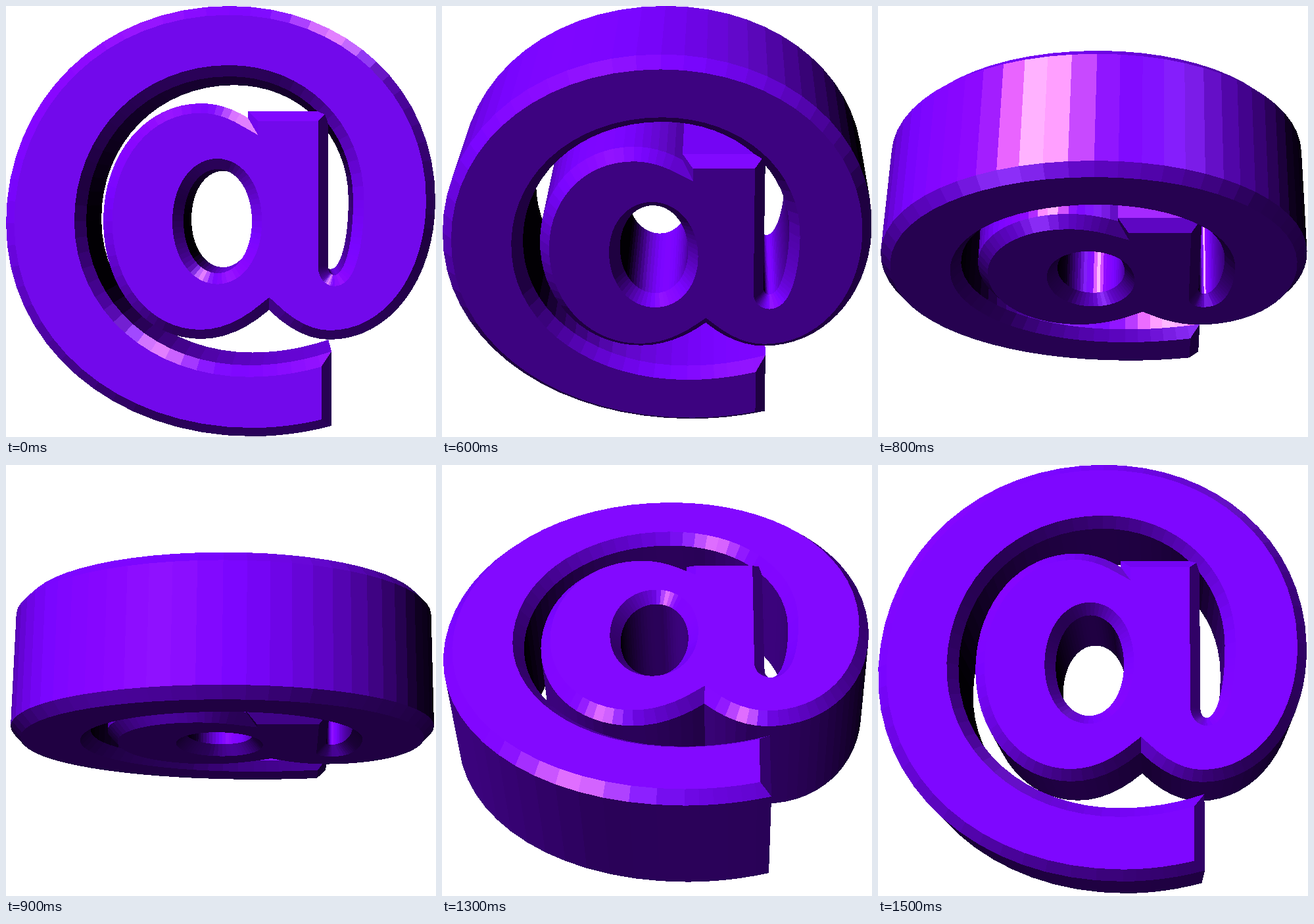
An HTML page with a canvas for the animation above (1600 ms loop, 654 by 655 pixels).

```html
<!DOCTYPE html>
<html lang="en">
<head>
<meta charset="utf-8">
<title>Turning at sign</title>
<style>
html, body { margin: 0; height: 100%; overflow: hidden; background: #fff; }
canvas { display: block; }
</style>
</head>
<body>
<canvas id="stage" width="654" height="655"></canvas>
<script>
const W = 654, H = 655;
const ctx = document.getElementById('stage').getContext('2d');

// Camera distance, vanishing point, height of the axis below it,
// half wall depth, bevel inset and bevel height
const FOCAL = 2200, VX = 432, VY = 284.5, AXIS = 41.5, WALL = 85, INSET = 15, RISE = 16;
const FRONT_SCALE = FOCAL / (FOCAL - WALL);

// Draws an outline through key points, given as seen from the front
class Outline {
  constructor(x, y) { this.points = [[x, y]]; }
  get last() { return this.points[this.points.length - 1]; }
  line(x, y) { this.points.push([x, y]); return this; }
  curve(x, y, cornerX, cornerY, pull, steps) {
    const [x0, y0] = this.last;
    const mix = (t, a, corner, b) => {
      const u = 1 - t, c = a + (corner - a) * pull, d = b + (corner - b) * pull;
      return u * u * u * a + 3 * u * u * t * c + 3 * u * t * t * d + t * t * t * b;
    };
    for (let k = 1; k <= steps; k++) this.line(mix(k / steps, x0, cornerX, x), mix(k / steps, y0, cornerY, y));
    return this;
  }
  // Quarter ovals that leave sideways or upright
  sideways(x, y) { return this.curve(x, y, x, this.last[1], 0.57, 16); }
  upright(x, y) { return this.curve(x, y, this.last[0], y, 0.57, 16); }
  // Shallow parabolas that start or end level
  fromLevel(x, y) { return this.curve(x, y, (this.last[0] + x) / 2, this.last[1], 2 / 3, 6); }
  toLevel(x, y) { return this.curve(x, y, (this.last[0] + x) / 2, y, 2 / 3, 6); }
  // Closes on the first point and converts to model units
  close() {
    this.points.pop();
    return this.points.map(([x, y]) => [(x - VX) / FRONT_SCALE, (y - VY) / FRONT_SCALE - AXIS]);
  }
}

const letter = new Outline(495, 525)
  .line(495, 638).toLevel(375, 654)                                     // tail
  .sideways(0, 330).upright(340, 0).sideways(653, 295).upright(492, 507) // outer ring
  .fromLevel(400, 462).toLevel(297, 506)                                // cusp
  .sideways(148, 327).upright(297, 148).fromLevel(368, 170)             // bowl
  .line(368, 160).line(490, 160).line(490, 395)                         // stem
  .upright(499, 409).sideways(528, 295)                                 // hook
  .upright(340, 107).sideways(122, 327).upright(370, 546)               // inner ring
  .fromLevel(495, 525).close();

const counter = new Outline(322, 248)
  .sideways(270, 327).upright(322, 406).sideways(374, 327).upright(322, 248).close();

// Each contour becomes four rings: front edge, two wall edges, back edge
function buildFaces() {
  const faces = [], front = [], back = [];
  for (const points of [letter, counter]) {
    const count = points.length;
    const normals = points.map(([x, y], i) => {
      const [x2, y2] = points[(i + 1) % count], len = Math.hypot(x2 - x, y2 - y);
      return [(y2 - y) / len, (x - x2) / len];
    });
    const inner = points.map(([x, y], i) => {
      const a = normals[(i + count - 1) % count], b = normals[i];
      const k = INSET / (1 + a[0] * b[0] + a[1] * b[1]);
      return [x - k * (a[0] + b[0]), y - k * (a[1] + b[1])];
    });
    const lift = (ring, z) => ring.map(([x, y]) => [x, y, z]);
    const rings = [lift(inner, WALL + RISE), lift(points, WALL), lift(points, -WALL), lift(inner, -WALL - RISE)];
    front.push(rings[0]);
    back.push(rings[3]);
    const slant = INSET / Math.hypot(INSET, RISE);
    normals.forEach(([nx, ny], i) => {
      const j = (i + 1) % count;
      [slant, 0, -slant].forEach((nz, k) => {
        const flat = Math.sqrt(1 - nz * nz);
        const quad = [rings[k][i], rings[k][j], rings[k + 1][j], rings[k + 1][i]];
        faces.push({ rings: [quad], normal: [nx * flat, ny * flat, nz] });
      });
    });
  }
  faces.push({ rings: front, normal: [0, 0, 1] }, { rings: back, normal: [0, 0, -1] });
  return faces;
}

const dot = (a, b) => a[0] * b[0] + a[1] * b[1] + a[2] * b[2];
const unit = v => v.map(c => c / Math.hypot(...v));
const KEY = unit([-0.4, -0.72, 0.57]), FILL = unit([0, 0.5, 0.87]);
const GLOSS = [
  { dir: unit([0.35, -0.63, 0.7]), power: 125 },
  { dir: unit([-0.2, -0.5, 0.84]), power: 180 },
  { dir: unit([-0.28, 0.08, 0.955]), power: 140 }
];

function shade(n) {
  const light = 2 + 126 * Math.max(0, dot(n, KEY)) + 42 * Math.max(0, dot(n, FILL));
  const shine = GLOSS.reduce((sum, { dir, power }) => sum + power * Math.max(0, dot(n, dir)) ** 80, 0);
  const [r, g, b] = [1, 0.045, 2.1].map(c => Math.min(255, Math.round(light * c + shine)));
  return (255 << 24 | b << 16 | g << 8 | r) >>> 0;
}

const faces = buildFaces();

function render(degrees) {
  const angle = degrees * Math.PI / 180, cos = Math.cos(angle), sin = Math.sin(angle);
  const turn = ([x, y, z]) => [x, y * cos + z * sin, z * cos - y * sin];
  const place = p => {
    const [x, y, z] = turn(p);
    return [x, y + AXIS, z];
  };
  const image = ctx.createImageData(W, H);
  const pixels = new Uint32Array(image.data.buffer).fill(0xffffffff);
  const depth = new Float32Array(W * H);

  for (const { rings, normal } of faces) {
    const n = turn(normal), offset = dot(n, place(rings[0][0])) - n[2] * FOCAL;
    if (offset >= 0) continue;
    const color = shade(n), rows = [];
    for (const ring of rings) {
      const flat = ring.map(p => {
        const [x, y, z] = place(p), s = FOCAL / (FOCAL - z);
        return [VX + x * s, VY + y * s];
      });
      flat.forEach((p, i) => {
        const q = flat[(i + 1) % flat.length];
        const [a, b] = p[1] < q[1] ? [p, q] : [q, p];
        const end = Math.min(H, Math.ceil(b[1] - 0.5));
        for (let y = Math.max(0, Math.ceil(a[1] - 0.5)); y < end; y++) {
          (rows[y] ||= []).push(a[0] + (b[0] - a[0]) * (y + 0.5 - a[1]) / (b[1] - a[1]));
        }
      });
    }
    rows.forEach((xs, y) => {
      xs.sort((a, b) => a - b);
      for (let k = 0; k + 1 < xs.length; k += 2) {
        const end = Math.min(W, Math.ceil(xs[k + 1] - 0.5));
        for (let x = Math.max(0, Math.ceil(xs[k] - 0.5)); x < end; x++) {
          // Perspective scale of the plane at this pixel; larger is nearer
          const near = (n[0] * (x + 0.5 - VX) + n[1] * (y + 0.5 - VY) - n[2] * FOCAL) / offset;
          const at = y * W + x;
          if (near > depth[at]) {
            depth[at] = near;
            pixels[at] = color;
          }
        }
      }
    });
  }
  return image;
}

// Twelve poses 15 degrees apart; past edge-on the front comes round again
const poses = Array.from({ length: 12 }, (_, i) => render(i > 6 ? i * 15 - 180 : i * 15));

function draw() {
  const t = performance.now() % 1600;
  ctx.putImageData(poses[t < 500 ? 0 : Math.floor((t - 400) / 100)], 0, 0);
  requestAnimationFrame(draw);
}
draw();
</script>
</body>
</html>
```
